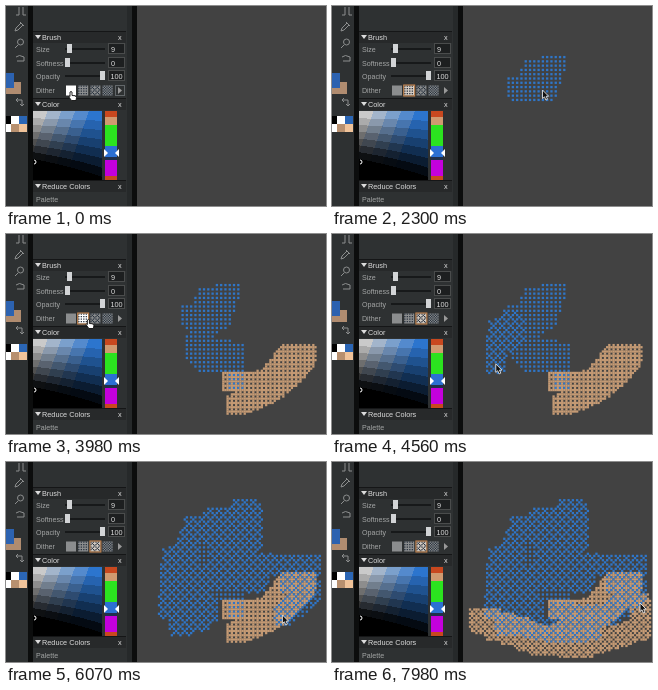
Animation of 320 by 200 pixels, one loop 8 s. Source, as an HTML page with a canvas:

```html
<!DOCTYPE html>
<html lang="en">
<head>
<meta charset="utf-8">
<title>Dither brush</title>
<style>
  html, body { margin: 0; width: 100%; height: 100%; overflow: hidden; background: #424242; }
  svg, canvas { position: absolute; left: 0; top: 0; width: 320px; height: 200px; }
  text { font: 7.1px "Liberation Sans", Arial, sans-serif; fill: #a4a6a6; }
  .head { font-size: 7.3px; fill: #dcdcdc; }
  .icon { fill: none; stroke: #8c8e8e; }
</style>
</head>
<body>
<svg id="panel" viewBox="0 0 320 200">
  <path fill="#2e3132" d="M0 0h121v200H0z"/>
  <path fill="#26292a" d="M121 0h5v200h-5z"/>
  <path fill="#0c0d0d" d="M22 0h5v200h-5zM126 0h5v200h-5z"/>
  <path class="icon" d="M10 9h3V1m4 0v8h3"/>
  <path class="icon" d="M9 25l1-3 5-5 2 2-5 5zM14 16l4 4"/>
  <circle class="icon" cx="14.500" cy="36" r="3"/>
  <path class="icon" d="M12 39l-3 3M10 51q3-3 8 0v4h-7"/>
  <path class="icon" d="M10 94h6v6M12 92l-2 2 2 2M14 98l2 2 2-2"/>
  <path fill="#b08c70" d="M0 76h15v12H0z"/>
  <path fill="#2c62b0" d="M0 67h8v15H0z"/>
</svg>
<canvas id="stage" width="320" height="200"></canvas>
<script>
const LOOP = 8000, CELL = 2.143, BRUSH = 9, X0 = 128.3, Y0 = -1.5, COLS = 90, ROWS = 96;
const BLUE = '#2f76c8', TAN = '#c49a74';
const g = document.getElementById('stage').getContext('2d');

// Panel
const rect = (x, y, w, h, fill, line = 'none') =>
  `<rect x="${x}" y="${y}" width="${w}" height="${h}" fill="${fill}" stroke="${line}"/>`;
const text = (x, y, s, cls = '') => `<text x="${x}" y="${y}" class="${cls}">${s}</text>`;
const header = (y, s) => rect(27, y, 93, 11, '#27292a') + rect(27, y - 1, 93, 1, '#151617') +
  `<path fill="#dcdcdc" d="M29 ${y + 3}h6l-3 4z"/>` + text(36, y + 7.5, s, 'head') + text(112, y + 7.5, 'x', 'head');
const slider = (y, s, knob, value) => text(30, y + 2.5, s) + rect(59, y - 1, 40, 2, '#17191a') +
  rect(knob, y - 5, 5, 9, '#d2d4d6') + rect(102.5, y - 5.5, 16, 10, '#1d1f20', '#4a4c4c') +
  text(value > 99 ? 104.5 : 105, y + 2.5, value, 'head');
const swatch = (fill, i) => rect([0, 5, 13][i % 3], i < 3 ? 110 : 118, 8, 8, fill);
const hues = [['#c8481f', 105], ['#d09a70', 111], ['#2be31f', 119], ['#2c70d2', 140],
  ['#20304c', 151], ['#c400dc', 154], ['#c8481f', 170]];
document.getElementById('panel').innerHTML +=
  header(26, 'Brush') + header(93, 'Color') + header(175, 'Reduce Colors') +
  slider(43, 'Size', 61, 9) + slider(57, 'Softness', 59, 0) + slider(70, 'Opacity', 94, 100) +
  text(30, 87, 'Dither') + text(30, 196, 'Palette') +
  ['#000', '#fff', '#2b66b5', '#fff', '#b8906f', '#f0c39a'].map(swatch).join('') +
  hues.map(([fill, y]) => rect(99, y, 12, 174 - y, fill)).join('') +
  '<path fill="#999" d="M112 81l4 3.500-4 3.500z"/>' +
  '<path fill="#fff" d="M98 143l4 4-4 4zM113 143l-4 4 4 4z"/>';

// Pointer legs: start, end, key points; painting legs add ink, dither level and sway
const legs = [
  [0, 1, [[64, 86]]],
  [770, 830, [[64, 86], [76, 86]]],
  [1490, 1710, [[138, 96], [182, 97]]],
  [2070, 2830, [[183, 80], [224, 62], [198, 98], [188, 119], [231, 122], [231, 148]], BLUE, 1, 8],
  [3070, 3700, [[226, 148], [264, 146], [285, 120], [301, 119], [286, 138], [262, 158], [230, 171]], TAN, 1, 0],
  [3760, 3820, [[110, 115], [78, 86]]],
  [3930, 4080, [[78, 86], [88, 86]]],
  [4380, 4730, [[186, 90], [166, 104], [162, 140], [205, 118]], BLUE, 2, 8],
  [4790, 5140, [[172, 160], [203, 152], [180, 90], [188, 68], [246, 50]], BLUE, 2, 6],
  [5140, 5550, [[246, 50], [248, 72], [212, 82], [212, 118], [242, 92], [236, 122], [266, 104]], BLUE, 2, 7],
  [5610, 6070, [[262, 104], [306, 102], [284, 120], [306, 128], [277, 153]], BLUE, 2, 0],
  [6070, 6410, [[277, 153], [226, 150], [262, 168], [230, 172], [196, 165]], BLUE, 2, 0],
  [6470, 6750, [[184, 164], [216, 183]], TAN, 2, 0],
  [6990, 7750, [[147, 157], [205, 178], [262, 182]], TAN, 2, 5],
  [7800, 7980, [[268, 180], [310, 166], [308, 141]], TAN, 2, 0]
];

function pointAt([start, end, pts, , , sway = 0], t) {
  const p = Math.min(1, (t - start) / (end - start)), f = p * (pts.length - 1);
  const i = Math.floor(f), a = pts[i], b = pts[i + 1] || a;
  const mix = k => a[k] + (b[k] - a[k]) * (f - i);
  return [mix(0), mix(1) + sway * Math.sin(p * 16 * Math.PI)];
}

// Ordered dither: 0 solid, 1 dots, 2 crosses, 3 checker
function dotted(level, c, r) {
  if (level === 0) return true;
  if (level === 3) return (c + r) % 2 === 0;
  return c % 2 === 0 && r % 2 === 0 ||
    level === 2 && c % 2 === 1 && c % 4 === r % 4;
}

// Tan fills the gaps that blue leaves
function stamp(cells, [x, y], ink, level) {
  const c0 = Math.round((x - X0) / CELL - BRUSH / 2), r0 = Math.round((y - Y0) / CELL - BRUSH / 2);
  for (let r = r0; r < r0 + BRUSH; r++)
    for (let c = c0; c < c0 + BRUSH; c++)
      if (c < COLS && r < ROWS && dotted(level, c, r) === (ink === BLUE))
        cells[r * COLS + c] = ink;
}

function drawPainting(t) {
  const cells = [];
  for (const leg of legs) {
    const [start, end, , ink, level] = leg;
    if (!ink || t < start) continue;
    const last = Math.min(t, end);
    for (let s = start; s < last; s += 6) stamp(cells, pointAt(leg, s), ink, level);
    stamp(cells, pointAt(leg, last), ink, level);
  }
  cells.forEach((ink, i) => {
    g.fillStyle = ink;
    g.fillRect(X0 + i % COLS * CELL, Y0 + Math.floor(i / COLS) * CELL, CELL + .15, CELL + .15);
  });
}

function drawSwatches(t, x, y) {
  const selected = t < 1010 ? 0 : t < 4150 ? 1 : 2;
  for (let i = 0; i < 4; i++) {
    const left = 60 + i * 12.2, top = 79.5;
    const hover = y < 91 && x >= left - 1 && x < left + 11.2;
    g.fillStyle = hover ? '#fff' : i === selected ? '#d6cdc4' : '#8b8d8e';
    g.fillRect(left, top, 10, 10);
    g.fillStyle = '#26303c';
    for (let n = 0; i && n < 64; n++)
      if (dotted(i, n % 8, n >> 3))
        g.fillRect(left + n % 8 * 1.25, top + (n >> 3) * 1.25, 1.25, 1.25);
    if (i === selected && t >= 180) {
      g.strokeStyle = '#cf8a50';
      g.strokeRect(left - .5, top - .5, 11, 11);
    }
  }
  if (t < 180) {
    g.strokeStyle = '#62676a';
    g.strokeRect(109.5, 79.5, 9, 10);
  }
}

// Saturation and value field in coarse slanted steps
const SIZE = 69, field = document.createElement('canvas');
field.width = field.height = SIZE;
const fg = field.getContext('2d');
for (let n = 0; n < SIZE * SIZE; n++) {
  const px = n % SIZE, py = Math.floor(n / SIZE), x = px / SIZE, y = py / SIZE;
  const sat = Math.min(1, Math.floor(5 * (x + .35 * y)) / 4);
  const light = Math.max(0, Math.ceil(7 * (1 - y * (1.45 - .4 * x))) / 7 - .06);
  fg.fillStyle = `rgb(${[.22, .58, 1.02].map(k => 215 * light * (1 - sat * (1 - k)))})`;
  fg.fillRect(px, py, 1, 1);
}

function drawPicker() {
  g.drawImage(field, 27, 105);
  g.strokeStyle = '#fff';
  g.beginPath();
  g.arc(28, 156, 2, -Math.PI / 2, Math.PI / 2);
  g.stroke();
}

const arrow = new Path2D('M0 0V8.500L2 6.800 3.400 10 5 9.200 3.700 6.200H6.200z');
const hand = new Path2D('M0 0Q1-1 2 0V3.500Q6 3 6.500 5.500L6 8.500H1.500L-1.500 4.500Q-1 3.500 0 4.500z');
function drawPointer(x, y) {
  const onPanel = x < 120, shape = onPanel ? hand : arrow;
  g.save();
  g.translate(x, y);
  g.fillStyle = onPanel ? '#fff' : '#111';
  g.strokeStyle = onPanel ? '#111' : '#e4e4e4';
  g.lineWidth = .9;
  g.fill(shape);
  g.stroke(shape);
  g.restore();
}

function draw(t) {
  const [x, y] = pointAt(legs.filter(leg => leg[0] <= t).pop(), t);
  g.clearRect(0, 0, 320, 200);
  g.lineWidth = 1;
  drawPainting(t);
  drawPicker();
  drawSwatches(t, x, y);
  drawPointer(x, y);
}

const begin = performance.now();
function tick() {
  draw((performance.now() - begin) % LOOP);
  requestAnimationFrame(tick);
}
tick();
</script>
</body>
</html>
```
